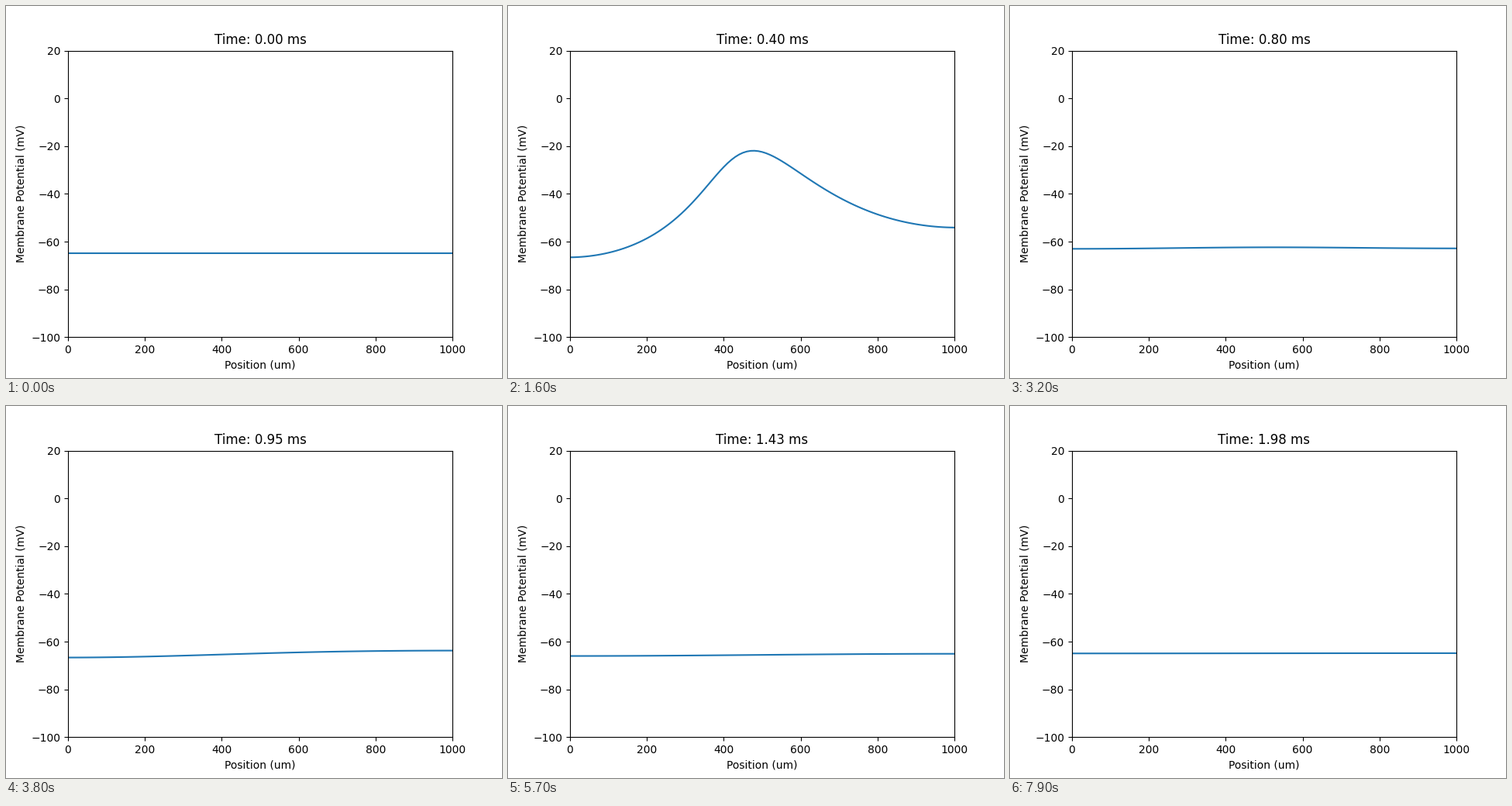
Animation of 640x480 px, one loop 8 s. Source, as a matplotlib script:

```python
import matplotlib.pyplot as plt
import numpy as np
from matplotlib.animation import FuncAnimation

FRAMES, INTERVAL = 80, 100
DT = 0.025                 # ms per frame
LENGTH, CELLS = 1000, 101  # um
DX = LENGTH / CELLS
REST = -65.0
PULSE_STEPS = 4

# Key points of the spike: step, position (um), potential (mV)
KEY_POINTS = [
    (4, 0, -98.8),
    (7, 0, -80.4), (7, 700, -46.5), (7, 800, -27.5), (7, 1000, -11.5),
    (16, 0, -66.4), (16, 300, -46.8), (16, 475, -21.8), (16, 1000, -54),
    (32, 500, -62.45),
    (44, 0, -66.8), (44, 1000, -64.5),
    (57, 0, -66.1), (79, 500, -65.05),
]


def vtrap(x, y):
    x = x + 1e-7
    return x / np.expm1(x / y)


def rates(v):
    """Hodgkin-Huxley opening and closing rates of the m, h and n gates."""
    return (
        (0.1 * vtrap(-(v + 40), 10), 4 * np.exp(-(v + 65) / 18)),
        (0.07 * np.exp(-(v + 65) / 20), 1 / (np.exp(-(v + 35) / 10) + 1)),
        (0.01 * vtrap(-(v + 55), 10), 0.125 * np.exp(-(v + 65) / 80)),
    )


def solve_cable(diag, rhs, c):
    """Tridiagonal solve with off-diagonal -c, for all parameter sets at once."""
    for i in range(1, CELLS):
        w = c / diag[i - 1]
        diag[i] -= c * w
        rhs[i] += w * rhs[i - 1]
    v = rhs / diag
    for i in range(CELLS - 2, -1, -1):
        v[i] = (rhs[i] + c * v[i + 1]) / diag[i]
    return v


def simulate(log_params):
    """Potential along the axon at every step: (steps, cells, parameter sets)."""
    speed, diffusion, field, na, k, leak = np.exp(log_params.T)
    coupling = diffusion / DX ** 2
    links = np.full((CELLS, 1), 2.0)
    links[0] = links[-1] = 1
    v = np.full((CELLS, len(log_params)), REST)
    gates = [a / (a + b) for a, b in rates(v)]
    history = [v]
    for step in range(FRAMES - 1):
        m, h, n = gates
        g_na, g_k, g_leak = 120 * na * m ** 3 * h, 36 * k * n ** 4, 0.3 * leak
        diag = 1 / DT + g_na + g_k + g_leak + coupling * links
        rhs = v / DT + 50 * g_na - 77 * g_k - 54.3 * g_leak
        if step < PULSE_STEPS:
            rhs[0] -= coupling * DX * field
            rhs[-1] += coupling * DX * field
        v = solve_cable(diag, rhs, coupling)
        gates = [
            a / (a + b) + (x - a / (a + b)) * np.exp(-DT * speed * (a + b))
            for x, (a, b) in zip(gates, rates(v))
        ]
        history.append(v)
    return np.array(history)


def residuals(log_params):
    step, pos, mv = np.array(KEY_POINTS).T
    cell = np.rint(pos / LENGTH * (CELLS - 1)).astype(int)
    return simulate(log_params)[step.astype(int), cell].T - mv


def best(candidates):
    return candidates[np.argmin((residuals(candidates) ** 2).sum(axis=1))]


def fit(rounds=12, eps=1e-4):
    """Random start around a warm axon, then damped least squares."""
    rng = np.random.default_rng(1)
    guess = np.log([29, 2.5e5, 0.2, 1.5, 1.5, 1.5])
    spread = np.array([0.3, 0.2, 0.1, 0.5, 0.5, 0.5])
    params = best(guess + spread * rng.standard_normal((800, 6)))
    for _ in range(rounds):
        res = residuals(np.vstack([params, params + eps * np.eye(6)]))
        jac = (res[1:] - res[0]).T / eps
        steps = [
            np.linalg.solve(jac.T @ jac + damping * np.eye(6), -jac.T @ res[0])
            for damping in np.logspace(-1, 4, 6)
        ]
        params = best(params + np.clip([np.zeros(6), *steps], -0.5, 0.5))
    return params


potential = simulate(fit()[None])[:, :, 0]

fig, ax = plt.subplots(figsize=(6.4, 4.8), dpi=100)
ax.set(xlim=(0, LENGTH), ylim=(-100, 20),
       xlabel="Position (um)", ylabel="Membrane Potential (mV)")
line, = ax.plot(np.linspace(0, LENGTH, CELLS), potential[0])
title = ax.set_title("Time: 0.00 ms")


def update(k):
    line.set_ydata(potential[k])
    title.set_text(f"Time: {k * DT:.2f} ms")
    return line, title


anim = FuncAnimation(fig, update, frames=FRAMES, interval=INTERVAL, repeat=True)
plt.show()
```
